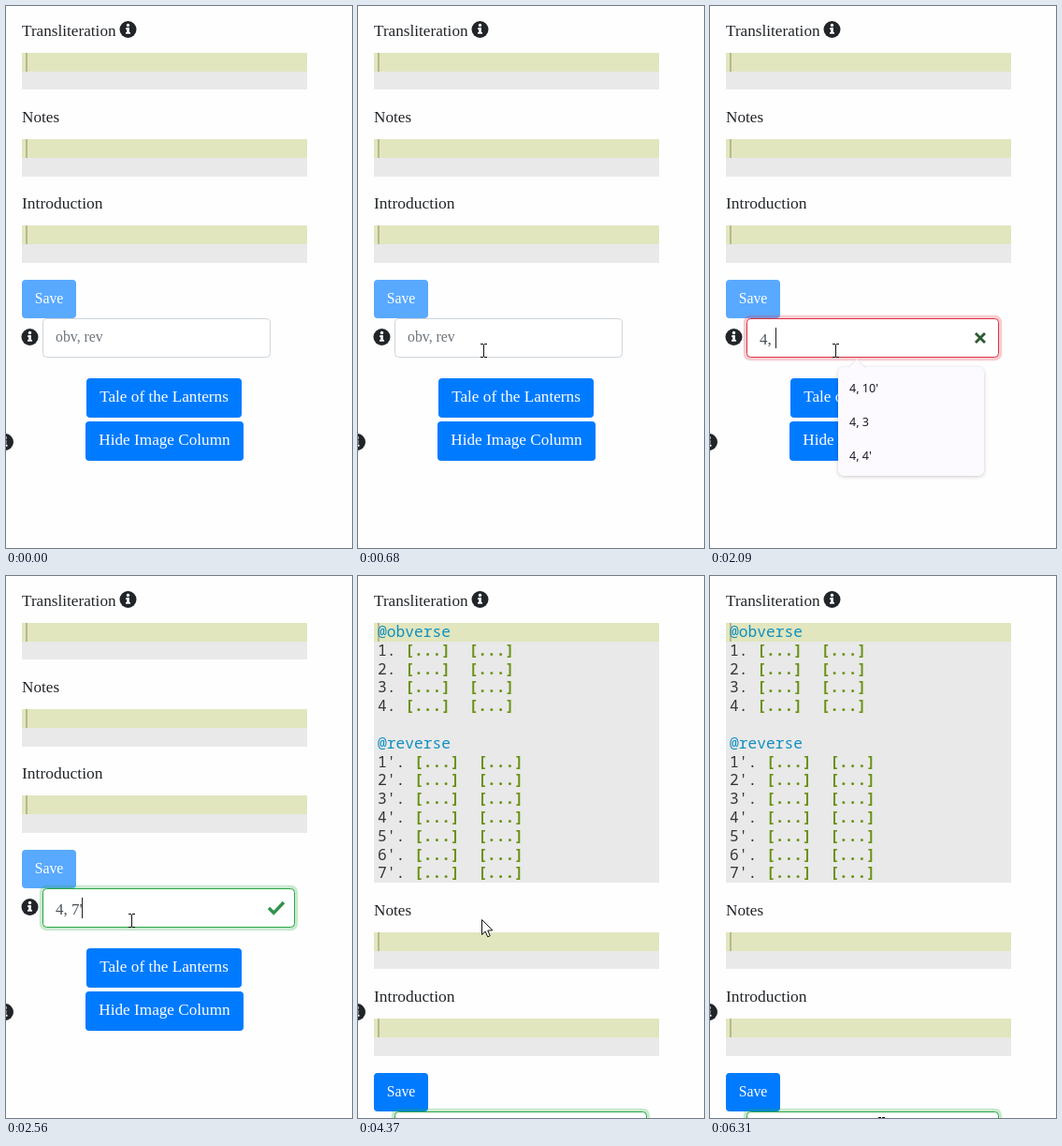
These frames come from a looping animation (370x578 px, 6.99 s). An HTML page with a canvas:

```html
<!DOCTYPE html>
<html lang="en">
<head>
<meta charset="utf-8">
<title>Edition form</title>
<style>
html, body { margin: 0; width: 100%; height: 100%; overflow: hidden; background: #fefefe; }
canvas { display: block; width: 370px; height: 578px; }
</style>
</head>
<body>
<canvas id="stage"></canvas>
<script>
const W = 370, H = 578, LOOP = 6990, TICK = 66.4, BLINK = 530;
const SERIF = '"Liberation Serif", serif';
const MONO = '"Noto Sans Mono", monospace';
const SANS = '"Noto Sans", sans-serif';
const INK = '#212529', LINE = 19.8, CHAR = 9.75;

const FOCUS = 750, CARET_BACK = 3840, DONE = 4370;
const ENTRY = "4, 7'", STROKES = [1030, 1960, 2030, 2360, 2560];
const HISTORY = ["10'", '3', "4'", '4', "4', 5", "47'", '41', "4, 10'", '4, 3', "4, 4'"];

// Border red, green, blue, then ring opacity and spread
const LOOKS = {
  plain: [206, 212, 218, 0, 0],
  focus: [128, 189, 255, 0.5, 3.2],
  valid: [40, 167, 69, 0.25, 3.2],
  wrong: [220, 53, 69, 0.25, 3.2]
};

// Pointer way points: time, x, y
const PATH = [
  [66, 152, 575], [465, 137, 375], [598, 133, 367],
  [4980, 133, 367], [5245, 136, 376],
  [5445, 136, 376], [5577, 131, 381],
  [5843, 131, 381], [6042, 124, 440], [6308, 182, 584]
];

const canvas = document.getElementById('stage');
const ctx = canvas.getContext('2d');
const dpr = window.devicePixelRatio || 1;
canvas.width = W * dpr;
canvas.height = H * dpr;

const mix = (a, b, u) => a + (b - a) * u;
const rgba = ([r, g, b], a = 1) => `rgba(${r},${g},${b},${a})`;
const shiftAt = t => t < DONE ? 0 : 12 * LINE + 0.2;
const typedAt = t => ENTRY.slice(0, STROKES.filter(s => s <= t).length);
const isValid = s => /^\d+'?(, \d+'?)*$/.test(s);

// Averages a list of values over the last 150 ms, as a short transition
function ease(t, valuesAt) {
  const samples = [0, 50, 100].map(lag => valuesAt(t - lag));
  return samples[0].map((_, i) => samples.reduce((sum, s) => sum + s[i], 0) / 3);
}

function lookAt(t) {
  const typed = typedAt(t);
  if (typed) return isValid(typed) ? LOOKS.valid : LOOKS.wrong;
  return t < FOCUS ? LOOKS.plain : LOOKS.focus;
}

function caretOn(t) {
  const events = [FOCUS, ...STROKES, CARET_BACK].filter(e => e <= t);
  return events.length > 0 && Math.floor((t - events.pop()) / BLINK) % 2 === 0;
}

function pointerAt(time) {
  const t = Math.floor(time / TICK + 0.3) * TICK;
  if (t < PATH[0][0]) return null;
  const next = PATH.findIndex(p => p[0] > t);
  if (next < 0) return PATH[PATH.length - 1].slice(1);
  const [t0, x0, y0] = PATH[next - 1], [t1, x1, y1] = PATH[next];
  const u = (t - t0) / (t1 - t0);
  return [Math.round(mix(x0, x1, u)), Math.round(mix(y0, y1, u))];
}

function over(t, top, bottom) {
  const at = pointerAt(t), dy = shiftAt(t);
  return !!at && at[1] >= top + dy && at[1] <= bottom + dy;
}

function text(str, x, y, size, color, family = SERIF, align = 'left', weight = 400) {
  ctx.font = `${weight} ${size}px ${family}`;
  ctx.textAlign = align;
  ctx.fillStyle = color;
  ctx.fillText(str, x, y);
}

function rect(x, y, w, h, color) {
  ctx.fillStyle = color;
  ctx.fillRect(x, y, w, h);
}

function dot(x, y, r, color) {
  ctx.beginPath();
  ctx.arc(x, y, r, 0, 2 * Math.PI);
  ctx.fillStyle = color;
  ctx.fill();
}

function paint(fill, stroke, width = 1) {
  ctx.lineWidth = width;
  if (fill) { ctx.fillStyle = fill; ctx.fill(); }
  if (stroke) { ctx.strokeStyle = stroke; ctx.stroke(); }
}

function round(x, y, w, h, r, fill, stroke) {
  ctx.beginPath();
  ctx.roundRect(x, y, w, h, r);
  paint(fill, stroke);
}

function poly(points, x, y) {
  ctx.beginPath();
  points.forEach(([px, py]) => ctx.lineTo(x + px, y + py));
}

function info(x, y) {
  dot(x, y, 9, INK);
  dot(x, y - 4.5, 1.7, '#fff');
  rect(x - 2.5, y - 1.7, 3.8, 1.8, '#fff');
  rect(x - 1.3, y - 1.7, 2.6, 5, '#fff');
  rect(x - 2.5, y + 2.9, 5, 1.8, '#fff');
}

function editor(y, lines = 2) {
  const top = Math.round(y);
  rect(17, top, 305, Math.round(y + lines * LINE) - top, '#e8e9e8');
  rect(17, top, 305, 20, '#e1e6be');
  rect(21, top, 2, 20, '#bcb68d');
}

function button(x, y, w, h, label, size, color) {
  round(x, y, w, h, 4, color);
  text(label, x + w / 2, y + 25, size, '#fff', SERIF, 'center');
}

function section(n, title, count) {
  const y = 65 + n * LINE, prime = title === '@reverse' ? "'" : '';
  text(title, 21, y, 16.25, '#128fc0', MONO);
  for (let i = 1; i <= count; i++) {
    const label = i + prime + '.', x = 21 + (label.length + 1) * CHAR;
    text(label, 21, y + i * LINE, 16.25, '#363636', MONO, 'left', 500);
    text('[...]  [...]', x, y + i * LINE, 16.25, '#6b9114', MONO, 'left', 600);
  }
}

function mark(valid, x, y) {
  if (valid) {
    poly([[-8, 0], [-2.7, 5.3], [8, -6]], x, y);
    paint(null, '#30934c', 3.4);
  } else {
    for (const s of [-1, 1]) {
      poly([[-5, -5 * s], [5, 5 * s]], x, y);
      paint(null, '#2d5a35', 2.8);
    }
  }
}

function input(t, dy) {
  const [r, g, b, alpha, spread] = ease(t, lookAt);
  const typed = typedAt(t), w = typed ? 270 : 244, y = 333 + dy;
  round(39 - spread, y - spread, w + 2 * spread, 42 + 2 * spread, 4 + spread, rgba([r, g, b], alpha));
  round(39.5, y + 0.5, w - 1, 41, 4, '#fff', rgba([r, g, b]));

  if (typed) {
    text(typed, 53, y + 28, 17, '#495057');
    mark(isValid(typed), 289, y + 21);
  } else {
    text('obv, rev', 53, y + 25, 15.8, '#6c757d');
  }
  if (caretOn(t)) {
    const before = t < CARET_BACK ? typed : typed.slice(0, -1);
    ctx.font = `17px ${SERIF}`;
    rect(Math.floor(53 + ctx.measureText(before).width), y + 10, 1, 22, '#222');
  }
}

function hints(t) {
  const list = HISTORY.filter(s => s.startsWith(typedAt(t)));
  if (t < FOCUS || !list.length) return;
  ctx.save();
  ctx.shadowColor = 'rgba(0,0,0,.2)';
  ctx.shadowBlur = 4 * dpr;
  ctx.shadowOffsetY = dpr;
  round(137, 385, 156, 8 + list.length * 36, 6, '#fcfafe');
  ctx.restore();
  poly([[-9, 9.5], [0, 0.5], [9, 9.5]], 157, 376);
  paint('#fcfafe', '#e3e1e6');
  list.forEach((s, i) => text(s, 149, 412 + i * 36, 12.6, '#1c1b2b', SANS, 'left', 500));
}

function beam(x, y) {
  rect(x + 1, y - 6, 1, 13, '#111');
  for (const sy of [y - 7, y + 7]) {
    rect(x - 2, sy, 3, 1, '#111');
    rect(x + 2, sy, 3, 1, '#111');
  }
}

function shape(points, x, y) {
  poly(points, x, y);
  ctx.closePath();
  paint('#fff', '#111');
}

const ARROW = [[0, 0], [0, 16], [3.7, 12.6], [6.2, 18.3], [8.7, 17.2], [6.3, 11.6], [11.3, 11.4]];
const HAND = [[-1, 0], [1, 0], [2, 6], [10, 9], [8, 20], [0, 20], [-6, 11], [-1, 12]];

function pointer(t) {
  const at = pointerAt(t);
  if (!at) return;
  const [x, y] = at;
  if (over(t, 142, 181) || over(t, 234, 274) || over(t, 333, 375)) beam(x, y);
  else if (over(t, 397, 439) || over(t, 443, 485)) shape(HAND, x + 0.5, y + 0.5);
  else shape(ARROW, x - 0.5, y - 0.5);
}

function linkButton(t, x, y, w, label) {
  const [u] = ease(t, s => [over(s, y, y + 42) ? 1 : 0]);
  const color = rgba([0, mix(123, 105, u), mix(255, 217, u)]);
  button(x, y + Math.round(shiftAt(t)), w, 42, label, 17.2, color);
}

function draw(t) {
  const done = t >= DONE, shift = shiftAt(t), dy = Math.round(shift);
  ctx.setTransform(dpr, 0, 0, dpr, 0, 0);
  rect(0, 0, W, H, '#fefefe');

  text('Transliteration', 17, 32, 17.2, INK);
  info(130.5, 25);
  editor(49.8, done ? 14 : 2);
  if (done) {
    section(0, '@obverse', 4);
    section(6, '@reverse', 7);
  }
  text('Notes', 17, 124 + dy, 17.2, INK);
  editor(141.95 + shift);
  text('Introduction', 17, 216 + dy, 17.5, INK);
  editor(234.1 + shift);
  info(-1, 465);

  button(17, 292 + dy, 58, 41, 'Save', 15.8, done ? '#007bff' : '#59a9ff');
  info(25.5, 353 + dy);
  input(t, dy);
  linkButton(t, 86, 397, 166, 'Tale of the Lanterns');
  linkButton(t, 85, 443, 169, 'Hide Image Column');
  hints(t);
  pointer(t);
}

const begin = performance.now();
function tick() {
  draw((performance.now() - begin) % LOOP);
  requestAnimationFrame(tick);
}
tick();
</script>
</body>
</html>
```
